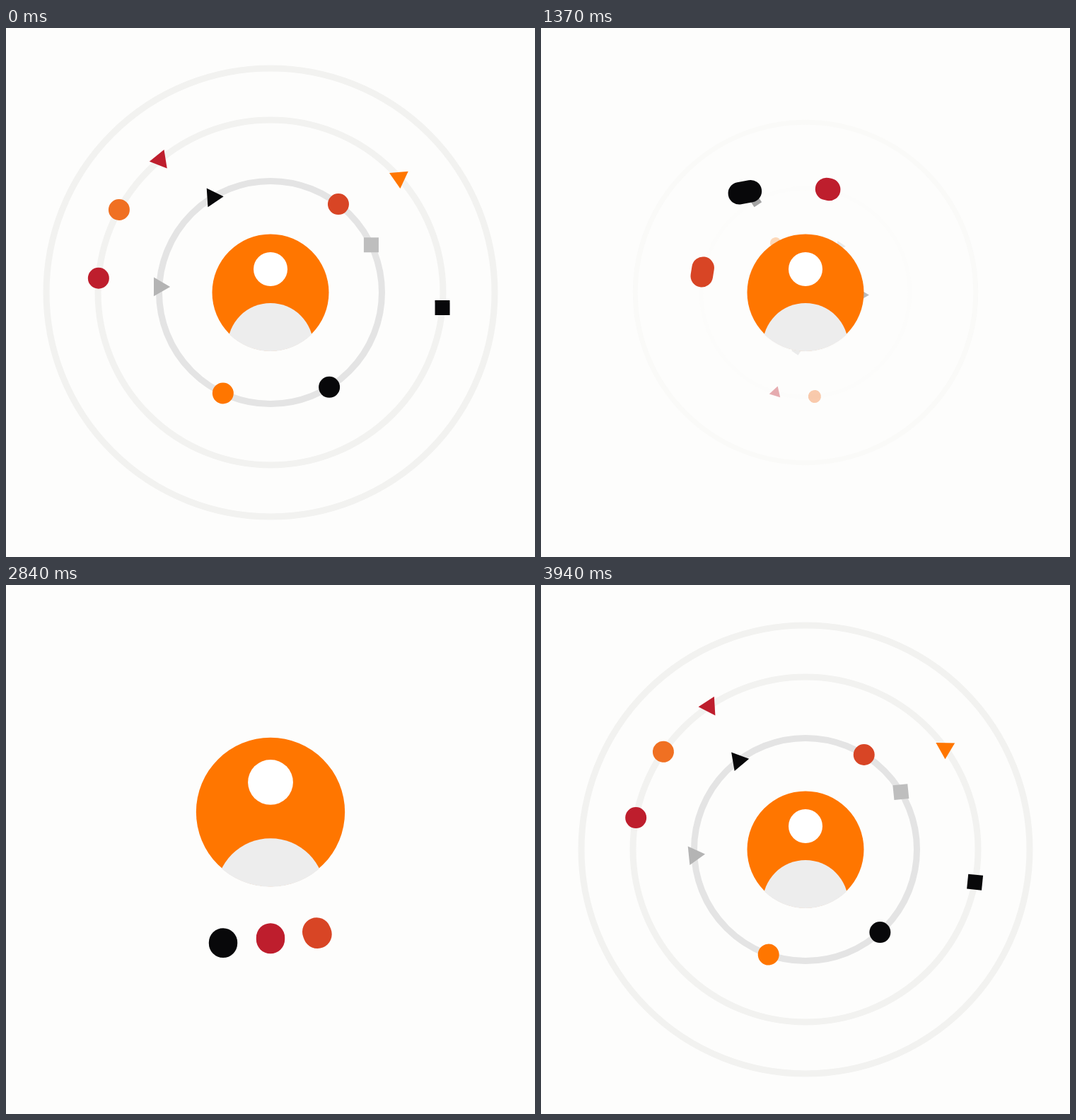
Recreate the animation shown at these times as an HTML page with a canvas. Size 748 px wide and 748 px high, loop 3980 ms.

```html
<!DOCTYPE html>
<html>
<head>
<meta charset="utf-8">
<title>Orbiting profile</title>
<style>
html, body { margin: 0; width: 100%; height: 100%; overflow: hidden; background: #fdfdfc; }
canvas { display: block; width: 748px; height: 748px; }
</style>
</head>
<body>
<canvas id="stage" width="748" height="748"></canvas>
<script>
const ctx = document.getElementById('stage').getContext('2d');
const LOOP = 3980, MID = 374, FREE = 650, HOME = 3260, TRAIL = 17;
const ORANGE = '#ff7600', BLACK = '#08080a', CRIMSON = '#be1e2d', RED = '#d84525';
const rad = d => d * Math.PI / 180;
const ramp = (t, a, b) => Math.max(0, Math.min(1, (t - a) / (b - a)));
const ease = (t, a, b) => { const u = ramp(t, a, b); return u * u * (3 - 2 * u); };
const polar = (r, a) => [MID + r * Math.cos(a), MID + r * Math.sin(a)];

// Degrees turned by the rings; slowest near 0.76 s
function spin(ms) {
  const s = ms / 1000, c = 0.762;
  return 70 * s + 125 * ((s - c) ** 3 + c ** 3) / 3;
}

const outer = { r: 317, dir: -1, color: '#f2f2f0', enter: -450, leave: 910, items: [] };
const middle = { r: 244, dir: -1, color: '#f2f2f0', enter: -540, leave: 780, items: [
  { kind: 'tri', a: -41.6, turn: 85, color: ORANGE },
  { kind: 'tri', a: -129.6, turn: 171, color: CRIMSON },
  { kind: 'dot', a: 208.8, color: '#f07022' },
  { kind: 'box', a: 5.2, color: BLACK }
] };
const inner = { r: 157.5, dir: 1, color: '#e4e4e4', enter: -630, leave: 720, items: [
  { kind: 'tri', a: 182.8, turn: 0, color: '#b4b4b4' },
  { kind: 'tri', a: -121.4, turn: -4, color: BLACK },
  { kind: 'dot', a: 115.1, color: ORANGE },
  { kind: 'box', a: -25.4, color: '#bebebe' }
] };
const rings = [outer, middle, inner];

// Flight keys: place and speed (px per ms) at the shared times
const TIMES = [FREE, 970, 1370, 1750, 2140, 2440];
const blobs = [
  { color: BLACK, ring: inner, a: 58, lead: 1.75, slot: -1, front: false, keys: [
    [381, 344, 0, -0.65], [289, 232, -0.47, 0.09], [135, 340, 0, 0.6], [261, 554, 0.73, 0]
  ] },
  { color: CRIMSON, ring: middle, a: 184.9, lead: 1, slot: 0, front: true, keys: [
    [318, 476, 0.47, -0.56], [406, 228, -0.12, 0.03], [352, 89, 0.1, 0], [373, 517, 0, 0.06]
  ] },
  { color: RED, ring: inner, a: -52.6, lead: 1, slot: 1, front: true, keys: [
    [426, 356, -0.47, -0.18], [227, 344, -0.1, 0.32], [532, 470, 0.1, -0.8], [470, 544, 0.08, 0.15]
  ] }
];

function onRing(b, ms) {
  const s = spin(ms);
  return polar(b.ring.r, rad(b.a + b.ring.dir * s * (s < 0 ? b.lead : 1)));
}

for (const b of blobs) {
  const [x, y] = onRing(b, FREE), [px, py] = onRing(b, FREE - 10);
  b.keys.unshift([x, y, (x - px) / 10, (y - py) / 10]);
  b.keys.push([MID + 67 * b.slot, 500, 0, 0]);
}

function hermite(p, q, v, w, h, u) {
  const n = 1 - u;
  return p * (1 + 2 * u) * n * n + q * u * u * (3 - 2 * u) + h * u * n * (v * n - w * u);
}

// Flight, then a bobbing row, then home behind the disc
function blobAt(b, t) {
  let i = 0;
  while (i < TIMES.length - 2 && t > TIMES[i + 1]) i++;
  const p = b.keys[i], q = b.keys[i + 1], h = TIMES[i + 1] - TIMES[i];
  const u = ramp(t, TIMES[i], TIMES[i + 1]);
  const home = ramp(t, 2840 - 50 * b.slot, 3200) ** 2;
  const bob = 8 * Math.sin((2840 - t) / 110 - 0.9 * b.slot) * ease(t, 2140, 2440);
  const x = hermite(p[0], q[0], p[2], q[2], h, u);
  const y = hermite(p[1], q[1], p[3], q[3], h, u) + bob;
  return [x + (MID - x) * home, y + (400 - y) * home];
}

function circle(x, y, r, color) {
  ctx.beginPath();
  ctx.arc(x, y, r, 0, 2 * Math.PI);
  ctx.fillStyle = color;
  ctx.fill();
}

function clipCircle(x, y, r, paint) {
  ctx.save();
  ctx.beginPath();
  ctx.arc(x, y, r, 0, 2 * Math.PI);
  ctx.clip();
  paint();
  ctx.restore();
}

function capsule(p, q, r, color) {
  ctx.beginPath();
  ctx.moveTo(p[0], p[1]);
  ctx.lineTo(q[0] + 0.01, q[1]);
  ctx.lineWidth = 2 * r;
  ctx.lineCap = 'round';
  ctx.strokeStyle = color;
  ctx.stroke();
}

function drawItem(item, r) {
  const a = rad(item.a);
  ctx.save();
  ctx.translate(r * Math.cos(a), r * Math.sin(a));
  ctx.fillStyle = item.color;
  if (item.kind === 'dot') circle(0, 0, 15, item.color);
  if (item.kind === 'box') ctx.fillRect(-10.5, -10.5, 21, 21);
  if (item.kind === 'tri') {
    ctx.rotate(rad(item.turn));
    ctx.beginPath();
    ctx.moveTo(15.4, 0);
    ctx.lineTo(-7.7, 13.4);
    ctx.lineTo(-7.7, -13.4);
    ctx.fill();
  }
  ctx.restore();
}

function drawRing(ring, ms) {
  const size = ms < 0 ? 1 - (1 - ramp(ms, ring.enter, ring.enter + 420)) ** 3
                      : 1 - ramp(ms, ring.leave, ring.leave + 940) ** 2;
  if (size < 0.01) return;
  ctx.save();
  ctx.translate(MID, MID);
  ctx.scale(size, size);
  ctx.globalAlpha = size ** 4;
  ctx.beginPath();
  ctx.arc(0, 0, ring.r, 0, 2 * Math.PI);
  ctx.lineWidth = 9;
  ctx.strokeStyle = ring.color;
  ctx.stroke();
  ctx.globalAlpha = size ** 2;
  if (ms < FREE) {
    for (const b of blobs.filter(b => b.ring === ring)) {
      const [x, y] = onRing(b, ms);
      circle(x - MID, y - MID, 15, b.color);
    }
  }
  ctx.rotate(rad(ring.dir * spin(ms)));
  for (const item of ring.items) drawItem(item, ring.r);
  ctx.restore();
}

function drawBlobs(t, front) {
  if (t < FREE || t > HOME) return;
  const r = 15 + 0.8 * ease(t, FREE, 970) + 4.4 * ease(t, 1370, 2140) - 10 * ease(t, 2950, 3200);
  for (const b of blobs) {
    if ((b.front && t < 1500) !== front) continue;
    capsule(blobAt(b, t - TRAIL), blobAt(b, t + TRAIL), r, b.color);
  }
}

function drawPerson(t) {
  const big = ease(t, 1560, 2090) - ramp(t, 2675, 3700) ** 0.62;
  const soft = Math.max(0, big) ** 0.6;
  const lift = ease(t, 1560, 2090) - ease(t, 2860, 3250);
  const sink = ease(t, 1580, 1950) - ease(t, 2640, 2920);
  const y = MID - 53 * lift, r = 82.5 + 33.5 * big, k = r / 82.5;
  const headY = y - 33 - 11.5 * soft, headR = 24 + 10 * soft;
  const look = s => MID + 24 * Math.sin(2 * Math.PI * ramp(s, 2080, 2680));

  circle(MID, y, r, ORANGE);
  capsule([look(t - TRAIL), headY], [look(t + TRAIL), headY], headR, '#fff');
  // Dots passing behind the disc show through the head
  clipCircle(look(t), headY, headR, () => drawBlobs(t, false));
  clipCircle(MID, y, r + 0.6, () => circle(MID, y + (75.5 + 73 * sink) * k, 60.5 * k, '#ededed'));
}

function draw(t) {
  ctx.fillStyle = '#fdfdfc';
  ctx.fillRect(0, 0, 748, 748);
  for (const ring of rings) drawRing(ring, t > HOME ? t - LOOP : t);
  drawBlobs(t, false);
  drawPerson(t);
  drawBlobs(t, true);
}

const begin = performance.now();
function tick() {
  draw((performance.now() - begin) % LOOP);
  requestAnimationFrame(tick);
}
tick();
</script>
</body>
</html>
```
